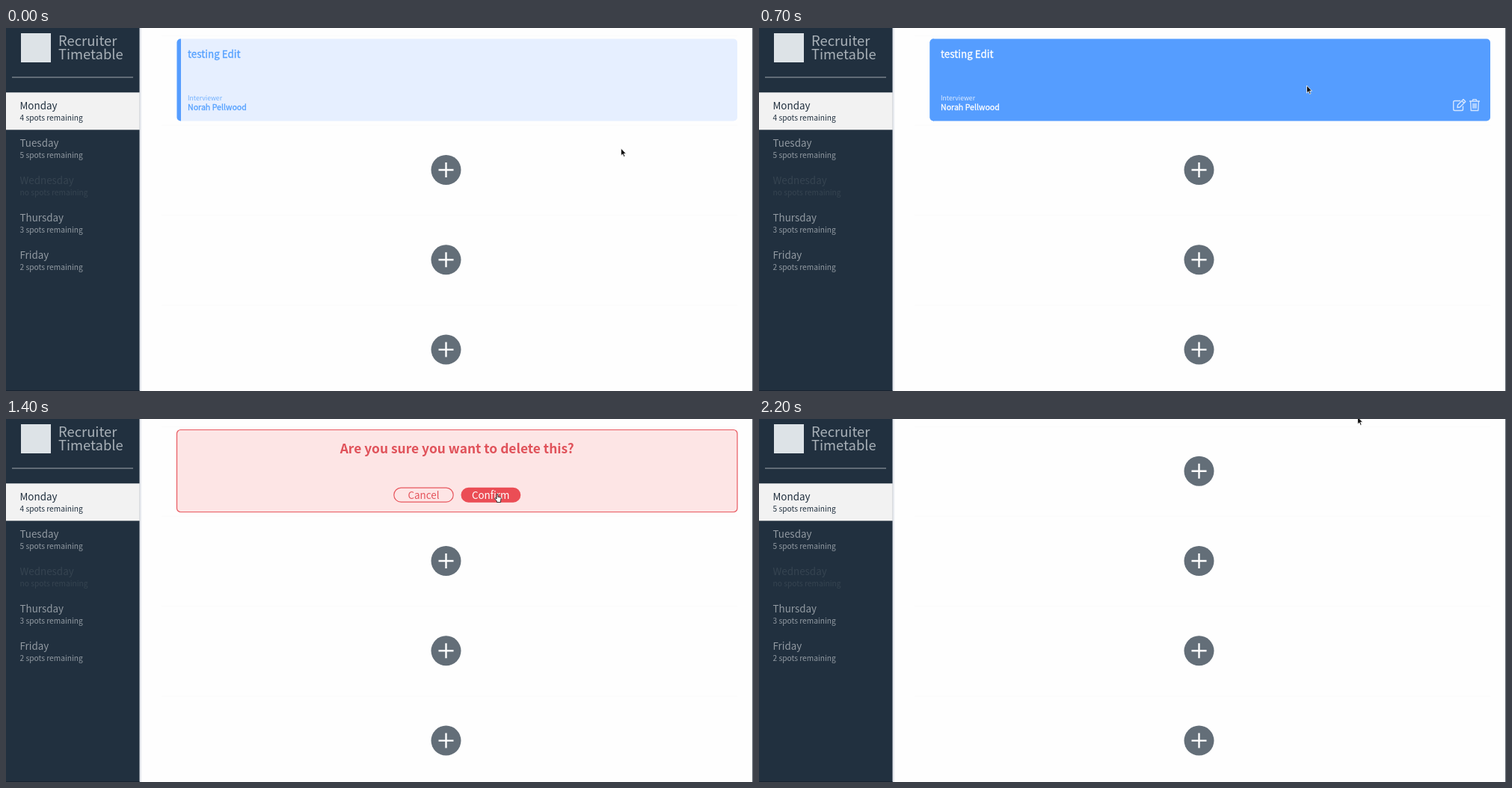
An HTML page that plays this animation: 999 px wide and 486 px high, repeating every 2.4 s.

```html
<!DOCTYPE html>
<html lang="en">
<head>
<meta charset="utf-8">
<title>Booking demo</title>
<style>
  html, body { margin: 0; height: 100%; overflow: hidden; background: #fefefe; }
  svg { display: block; width: 100vw; height: 100vh; cursor: default; }
  text { font: 400 13.4px "Noto Sans CJK JP", "Noto Sans CJK SC", "Noto Sans CJK", "Noto Sans", sans-serif; }
  .brand { font-size: 18.4px; font-weight: 300; fill: #aab2b9; }
  .day { fill: #929aa2; }
  .day .spots { font-size: 10.2px; font-weight: 300; }
  .day.full { fill: #364451; }
  .day.selected { fill: #21303f; }
  .label { font-size: 8.65px; font-weight: 300; opacity: .8; }
  .person { font-size: 10.6px; }
  .medium { stroke: currentColor; stroke-width: .3; }
  .big { font-size: 17.4px; font-weight: 700; }
  .mid { text-anchor: middle; }
  #show { color: #54a0ff; fill: currentColor; }
  #show.hover { color: #fff; }
  #show .back { fill: #e6efff; }
  #show.hover .back { fill: #559dff; }
  #show .tools { display: none; fill: none; stroke: #d3e5ff; stroke-width: 1.4; stroke-linejoin: round; }
  #show.hover .tools { display: inline; }
</style>
</head>
<body>
<svg viewBox="0 0 999 486" preserveAspectRatio="none">
  <defs>
    <linearGradient id="shade">
      <stop stop-color="#d0d5df"/><stop offset="1" stop-color="#fefefe"/>
    </linearGradient>
    <g id="add">
      <circle r="20" fill="#636e78"/>
      <path d="M-10 0H10M0-10V10" stroke="#fff" stroke-width="2.4"/>
    </g>
    <rect id="card" x="228.5" y="14.5" width="749.5" height="110" rx="5"/>
  </defs>

  <rect width="999" height="486" fill="#fefefe"/>
  <path d="M208 10H978M208 130H978M208 250.5H978M208 371H978" stroke="#fafafa"/>
  <rect x="178" width="4" height="486" fill="url(#shade)"/>
  <rect width="178.5" height="486" fill="#21303f"/>
  <path d="M0 485.5H178.5" stroke="#182330"/>
  <path d="M998.5 0V486" stroke="#59616b"/>

  <rect x="20" y="7" width="40" height="39" fill="#dde3e7"/>
  <text class="brand" x="70" y="24">Recruiter</text>
  <text class="brand" x="70" y="42">Timetable</text>
  <path d="M8 66H170" stroke="#a0a7ae"/>
  <rect y="86.3" width="178.8" height="50" fill="#f2f2f2"/>
  <g id="days"></g>

  <use href="#add" x="588.5" y="190"/>
  <use href="#add" x="588.5" y="310.3"/>
  <use href="#add" x="588.5" y="430.6"/>

  <g id="empty"><use href="#add" x="588.5" y="69.7"/></g>

  <g id="show">
    <use class="back" href="#card"/>
    <path d="M234 14.5H233.5A5 5 0 0 0 228.5 19.5V119.5A5 5 0 0 0 233.5 124.5H234Z" fill="#559dff"/>
    <text class="medium" x="243" y="40">testing Edit</text>
    <text class="label" x="243" y="97">Interviewer</text>
    <text class="person medium" x="243" y="110">Norah Pellwood</text>
    <g class="tools">
      <path d="M938 97.5H930.5Q928.7 97.5 928.7 99.3V108.7Q928.7 110.5 930.5 110.5H939.7Q941.5 110.5 941.5 108.7V104.5"/>
      <path d="M934 106.5L934.5 103 942 95.6 944.8 98.4 937.4 106ZM940 97.6L942.8 100.4"/>
      <path d="M950 98H964M954 98L955 95.6H959L960 98M951.6 98L952.2 110.5H961.8L962.4 98M955 100.7V107.8M957 100.7V107.8M959 100.7V107.8"/>
    </g>
  </g>

  <g id="confirm">
    <use href="#card" fill="#fde5e5" stroke="#e8585f" stroke-width="1.2"/>
    <text class="big mid" x="603.2" y="46" fill="#e0525a">Are you sure you want to delete this?</text>
    <rect x="518.8" y="92.2" width="79.4" height="19" rx="9.5" fill="none" stroke="#e8585f" stroke-width="1.2"/>
    <rect x="608.5" y="91.7" width="79.8" height="20" rx="10" fill="#eb4d55"/>
    <text class="mid" x="558.5" y="107" fill="#e5535b">Cancel</text>
    <text class="mid" x="648.2" y="107" fill="#fff">Confirm</text>
  </g>

  <g id="deleting">
    <use href="#card" fill="#21303f"/>
    <g fill="none" stroke-width="2.6">
      <circle cx="549" cy="70" r="13.8" stroke="#4b5662"/>
      <circle id="spinner" cx="549" cy="70" r="13.8" stroke="#fff" stroke-dasharray="28 90"/>
    </g>
    <text class="big" x="584" y="77" fill="#fff">Deleting...</text>
  </g>

  <g id="pointer" stroke-linejoin="round">
    <path id="arrow" d="M0 0V10L2.3 7.9 3.9 11.4 5.5 10.7 4 7.3H7Z" fill="#111" stroke="#fff" stroke-width=".8"/>
    <path id="hand" d="M-.9 7V.9Q0-.4 .9 .9V4.3L4.6 5.1Q5.3 5.4 5.2 6.3L4.5 9.4V11.5H-.6V9.9L-3.5 6.7Q-3.4 5.2-2 5.9Z" fill="#fff" stroke="#222" stroke-width=".9"/>
  </g>
</svg>
<script>
const $ = id => document.getElementById(id);
const LOOP = 2400, STEP = 100;

const days = [["Monday", 4], ["Tuesday", 5], ["Wednesday", "no"], ["Thursday", 3], ["Friday", 2]];
$("days").innerHTML = days.map(([name, spots], i) => `
  <g class="day ${i ? spots === "no" ? "full" : "" : "selected"}">
    <text x="18.5" y="${109 + 50 * i}">${name}</text>
    <text class="spots" x="18.5" y="${124 + 50 * i}">${spots} spots remaining</text>
  </g>`).join("");
const mondaySpots = document.querySelector(".selected .spots");

// Pointer stops: time, x, y
const path = [
  [0, 822.4, 161], [300, 812.4, 214.6], [500, 812.4, 214.6], [700, 732.5, 77], [800, 732.5, 77],
  [1100, 963, 105], [1200, 957, 103], [1400, 657, 100], [1600, 657, 101],
  [1900, 657, 101], [2200, 800.5, -3], [LOOP, 800.5, -3]
];

function pointerAt(t) {
  const i = path.findIndex(stop => stop[0] > t);
  const [t0, x0, y0] = path[i - 1], [t1, x1, y1] = path[i];
  const k = (t - t0) / (t1 - t0);
  return [x0 + (x1 - x0) * k, y0 + (y1 - y0) * k];
}

const modeAt = t => t < 1200 ? "show" : t < 1600 ? "confirm" : t < 1800 ? "deleting" : "empty";
const toggle = (id, on) => $(id).style.display = on ? "" : "none";

function draw(now) {
  const t = Math.floor(now % LOOP / STEP) * STEP;
  const mode = modeAt(t);
  const [x, y] = pointerAt(t);
  for (const id of ["show", "confirm", "deleting", "empty"]) toggle(id, id === mode);
  $("show").classList.toggle("hover", y < 125);
  mondaySpots.textContent = `${mode === "empty" ? 5 : 4} spots remaining`;
  $("spinner").setAttribute("transform", `rotate(${155 + (t - 1600) * .36} 549 70)`);

  const hand = t === 1200 || t >= 1400 && t < 1800;
  toggle("hand", hand);
  toggle("arrow", !hand);
  $("pointer").setAttribute("transform", `translate(${x} ${y})`);
}

const start = performance.now();
function tick() {
  draw(performance.now() - start);
  requestAnimationFrame(tick);
}
tick();
</script>
</body>
</html>
```
